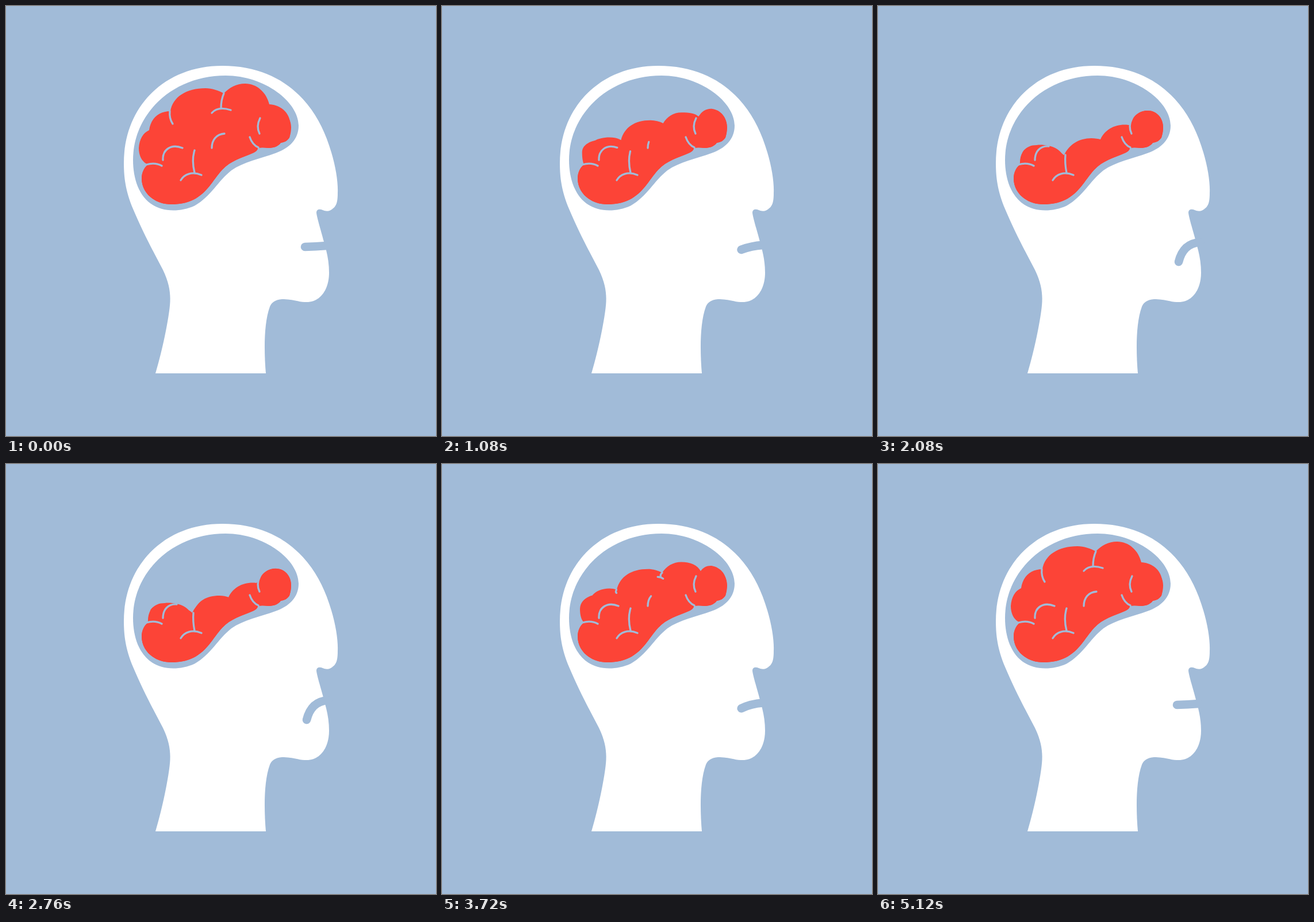
An HTML page for the animation above (5280 ms loop, 748 by 748 pixels).

```html
<!DOCTYPE html>
<html lang="en">
<head>
<meta charset="utf-8">
<title>Shrinking brain</title>
<style>
  html, body { margin: 0; width: 100%; height: 100%; overflow: hidden; background: #a1bbd8; }
  svg { display: block; width: 100%; height: 100%; }
  .sky { fill: #a1bbd8; }
  .red { fill: #fc4437; }
  .fold, .mouth { fill: none; stroke: #a1bbd8; stroke-linecap: round; stroke-width: 3.3; }
  .mouth { stroke-width: 14.6; }
</style>
</head>
<body>
<svg id="stage" viewBox="0 0 748 748">
  <rect class="sky" width="748" height="748"/>
  <path fill="#fff" d="M260 639C270 606 280 560 284 530C287 508 287 488 273 459
    C255 425 238 393 221 353C208 322 205 298 205 273C205 176 275 104 376 104
    C478 104 533 165 558 231C572 268 578 303 577 325C577 337 576 347 569 352
    C564 357 558 358 551 355C546 353 540 353 540 360C541 369 549 394 553 410
    L557 425C560 437 562 450 562 464C562 493 547 515 523 515C508 515 495 509 480 510
    C469 511 462 515 459 523C448 553 449 602 452 639Z"/>
  <path class="sky" d="M382 121C450 121 509 167 509 208C509 232 493 247 470 255.5
    C442 266 413 271 392 286C368 305 357 331 328 347.5C316 353 303 355.5 291 355.5
    C240 355.5 221 312 221 268C221 187 290 121 382 121Z"/>
</svg>
<script>
const LOOP = 5280, STEP = 40;
const stage = document.getElementById('stage');

// Underside shared by the full and the shrunken brain
const under = `C489 235 484 237 478 238C473 245 464 247 456 247C449 246 443 246 438 247
  C438 251 434 254 429 256C410 264 391 269 376 285C359 304 350 325 326 337
  C314 343 300 345 288 345C258 345 236 325 236 300C236 289 241 280 247 276Z`;

const small = `M247 276C246 258 254 242 276 242C283 241 290 242 296 243
  C308 245 317 251 323 261C330 244 347 230 371 230C378 230 383 231 387 232
  C394 216 410 206.5 429 206.5C434 206.5 437 207 440 208C441 192 454 182 469 182
  C485 182 496 195 496 211C496 219 494 226 493 229`;

const lobes = [
  `M247 276C236 271 231 260 231 247C232 232 238 221 249 216
   C252 195 266 183 286 183C290 158 314 143 347 143C358 143 370 147 379 152
   C388 142 401 135 416 135C436 135 453 150 458 171
   C462 171 466 172 469 173C485 178 495 191 495 210C495 219 494 226 493 229`,
  `M247 276C250 271 251 267 251 258C251 250 262 246 277 244
   C286 249 316 249 326 262C333 242 347 231 372 231C378 231 383 232 388 234
   C393 222 403 214 417 214C427 214 435 208 440 205
   C445 190 456 182 469 182C485 182 496 195 496 211C496 219 494 226 493 229`
];

const stillFolds = [
  'M271 278C262 273 254 273 244 276',
  'M304 303C310 293 323 287 340 294',
  'M442 195C437 205 437 214 441 222',
  'M424 228C427 237 432 243 439 246'
];

// Folds that move with the lobes until they close up
const movingFolds = [
  ['M285 183C284 192 286 199 290 205', 'M326 262C325 256 320 252 320 248'],
  ['M379 152C375 161 374 170 374 178', 'M388 234C387 228 387 222 388 218'],
  ['M358 186C366 177 378 177 391 181', 'M396 209C393 220 387 222 377 222']
];

// Folds that shorten late, as the outline reaches them
const lateFolds = [
  ['M273 268C272 250 287 239 307 247', 'M273 268C273 253 282 243 297 244'],
  ['M328 251C324 264 325 278 328 290', 'M326 259C325 270 326 280 328 290']
];

const mouthPoses = [
  'M520 419C532 418.6 544 418 558 417',
  'M523 445C528 425 539 412.5 560 411'
];

function add(cls, d) {
  const el = document.createElementNS(stage.namespaceURI, 'path');
  el.setAttribute('class', cls);
  if (d) el.setAttribute('d', d);
  stage.append(el);
  return el;
}

const clamp = v => Math.min(1, Math.max(0, v));
const ease = (t, from, to) => (1 - Math.cos(Math.PI * clamp((t - from) / (to - from)))) / 2;

// Blend two paths that have the same commands
function mix([a, b], k) {
  const ends = b.match(/[\d.]+/g);
  let i = 0;
  return a.replace(/[\d.]+/g, n => (+n + (ends[i++] - n) * k).toFixed(2));
}

const show = (el, on) => el.setAttribute('visibility', on ? 'visible' : 'hidden');

add('red', small + under);
const brain = add('red');
stillFolds.forEach(d => add('fold', d));
const late = lateFolds.map(() => add('fold'));
const moving = movingFolds.map(() => add('fold'));
const curl = add('fold', 'M358 247C358 233 366 223 380 222');
const mouth = add('mouth');
const curlLength = curl.getTotalLength();

function draw(t) {
  const shrink = ease(t, 0, 1840) - ease(t, 2540, 4760);
  const frown = ease(t, 760, 1880) - ease(t, 2880, 4120);

  brain.setAttribute('d', mix(lobes, shrink) + under);
  late.forEach((el, i) => el.setAttribute('d', mix(lateFolds[i], clamp((shrink - 0.55) / 0.38))));
  moving.forEach((el, i) => {
    el.setAttribute('d', mix(movingFolds[i], shrink));
    show(el, shrink < 0.6);
  });

  const left = 1 - 1.12 * shrink;
  show(curl, left > 0.02);
  curl.setAttribute('stroke-dasharray', `${Math.max(0, left) * curlLength} 99`);

  mouth.setAttribute('d', mix(mouthPoses, frown));
}

const start = performance.now();
function tick() {
  const t = (performance.now() - start) % LOOP;
  draw(Math.floor(t / STEP) * STEP);
  requestAnimationFrame(tick);
}
tick();
</script>
</body>
</html>
```
